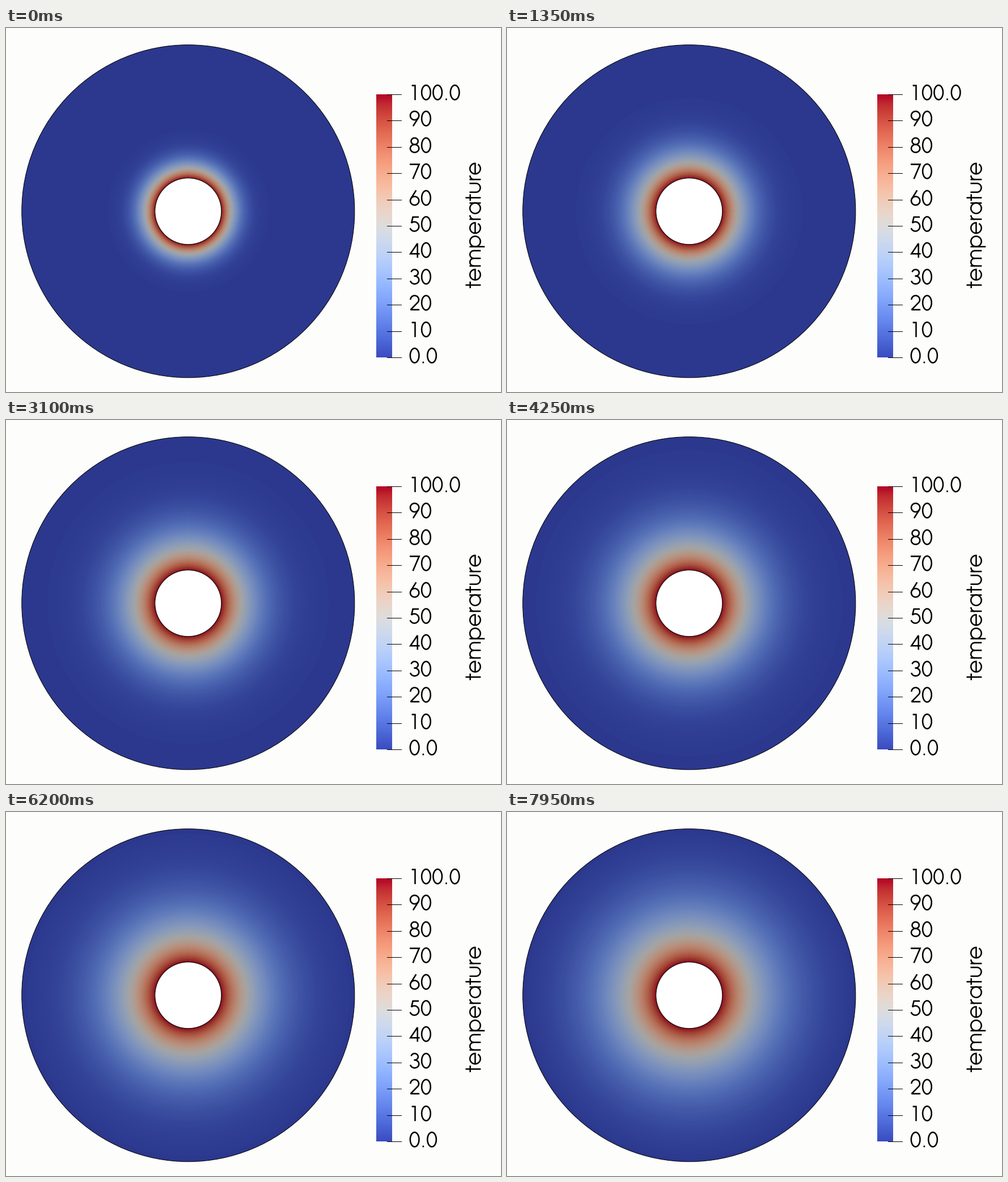
These frames come from a looping animation (873 px wide and 642 px high, 8 s). A matplotlib script:

```python
import numpy as np
import matplotlib
import matplotlib.pyplot as plt
from matplotlib.animation import FuncAnimation
from matplotlib.patches import Circle

W, H, DPI = 873, 642, 100
PT = 72 / DPI                      # points per pixel
FRAMES, INTERVAL = 160, 50
STEP_MS = 60                       # one simulation step

CX, CY = 321.3, 323.2
R_IN, R_OUT = 58.5, 293.5
SHADE = 0.74                       # lighting on the disc surface
START = 11                         # steps already elapsed at time zero
DIFFUSION = 41                     # px^2 per simulation step

CMAP = matplotlib.colormaps["coolwarm"]


# --- heat equation on the annulus, radially symmetric -----------------------
def solve(steps, dr=0.5, substeps=4):
    r = np.arange(R_IN, R_OUT + dr / 2, dr)
    n = len(r)
    k = DIFFUSION / substeps / dr ** 2
    m = np.eye(n)
    for i in range(1, n - 1):
        lo, hi = k * (1 - dr / (2 * r[i])), k * (1 + dr / (2 * r[i]))
        m[i, i - 1:i + 2] = -lo, 1 + lo + hi, -hi
    advance = np.linalg.matrix_power(np.linalg.inv(m), substeps)
    temp = np.zeros(n)
    temp[0] = 1
    out = []
    for _ in range(steps):
        out.append(temp)
        temp = advance @ temp
    return r, np.array(out)


# --- stroke lettering, units of 1/1000 em -----------------------------------
def arc(cx, cy, rx, ry, a0=0, a1=360):
    a = np.radians(np.linspace(a0, a1, 60))
    return np.column_stack([cx + rx * np.cos(a), cy + ry * np.sin(a)])


def line(*pts):
    return np.array(pts, float)


def join(*parts):
    return np.vstack(parts)


def turned(strokes):
    return [np.array([554, 740]) - s for s in strokes]


SIX = [arc(277, 230, 208, 207), line((97, 333), (350, 737))]
ARCH = arc(285, 340, 185, 185, 180, 0)

GLYPHS = {
    "0": (554, [arc(277, 370, 213, 348)]),
    "1": (554, [line((140, 704), (300, 704), (300, 0))]),
    "2": (554, [join(arc(277, 517, 200, 200, 180, -38),
                     line((85, 36), (510, 36)))]),
    "3": (554, [join(arc(277, 560, 168, 157, 168, -90),
                     arc(277, 212, 208, 190, 90, -168))]),
    "4": (554, [line((521, 190), (75, 190), (415, 690), (415, 0))]),
    "5": (554, [join(line((480, 704), (195, 704)),
                     arc(265, 248, 218, 225, 130, -160))]),
    "6": (554, SIX),
    "7": (554, [line((42, 704), (495, 704), (195, 0))]),
    "8": (554, [arc(277, 560, 168, 157), arc(277, 212, 208, 190)]),
    "9": (554, turned(SIX)),
    ".": (277, [line((139, 0), (139, 76))]),
    "t": (339, [line((160, 740), (160, 0)), line((10, 513), (330, 513))]),
    "e": (650, [join(line((71, 272)), arc(325, 272, 254, 254, 0, 328))]),
    "m": (938, [line((100, 0), (100, 547)),
                join(ARCH, line((470, 0))),
                join(ARCH + [370, 0], line((840, 0)))]),
    "p": (682, [line((98, -192), (98, 547)), arc(350, 272, 254, 254)]),
    "r": (301, [line((100, 0), (100, 547)),
                arc(295, 340, 195, 182, 180, 90)]),
    "a": (683, [line((585, 0), (585, 547)), arc(333, 272, 254, 254)]),
    "u": (608, [join(line((90, 547)), arc(304, 235, 214, 212, 180, 360),
                     line((518, 547)))]),
}


def stroke_line(ax, x, y, width):
    ax.plot(x, y, color="black", lw=width * PT, snap=False,
            solid_capstyle="butt", solid_joinstyle="miter")


def letter(ax, text, x, y, size, upright=True):
    s, pen = size / 1000, 0
    for ch in text:
        width, strokes = GLYPHS[ch]
        for stroke in strokes:
            u, v = (pen + stroke[:, 0]) * s, stroke[:, 1] * s
            px, py = (x + u, y - v) if upright else (x - v, y - u)
            stroke_line(ax, px, py, 70 * s)
        pen += width


# --- stage ------------------------------------------------------------------
fig = plt.figure(figsize=(W / DPI, H / DPI), dpi=DPI, facecolor="#fdfdfc")
ax = fig.add_axes([0, 0, 1, 1])
ax.axis("off")

radii, profiles = solve(START + FRAMES * INTERVAL // STEP_MS + 1)
colors = CMAP(profiles)[..., :3] * SHADE
colors = np.round(colors * 255).astype(np.uint8)

x0, x1, y0, y1 = 26, 616, 28, 619
gx, gy = np.meshgrid(np.arange(x0, x1) + 0.5, np.arange(y0, y1) + 0.5)
dist = np.hypot(gx - CX, gy - CY)
index = np.clip(np.rint((dist - R_IN) * 2), 0, len(radii) - 1).astype(int)

disc = ax.imshow(colors[START][index], extent=(x0, x1, y1, y0),
                 interpolation="nearest", aspect="auto")
disc.set_clip_path(Circle((CX, CY), R_OUT, transform=ax.transData))
for radius, fill in ((R_OUT, "none"), (R_IN, "white")):
    ax.add_patch(Circle((CX, CY), radius, fc=fill, ec="black", lw=PT))

# colour bar
TOP, BOTTOM = 117, 581
ax.imshow(np.linspace(1, 0, BOTTOM - TOP)[:, None], cmap=CMAP,
          extent=(653, 681, BOTTOM, TOP), interpolation="nearest",
          aspect="auto")
for i in range(11):
    y = TOP + round((BOTTOM - TOP) * i / 10) + 0.5
    value = 100 - 10 * i
    stroke_line(ax, [672, 698], [y, y], 1)
    label = f"{value:.1f}" if value in (0, 100) else str(value)
    letter(ax, label, 710.5, y + 9.7, 36.6)
letter(ax, "temperature", 837.3, 459.2, 36.3, upright=False)

ax.set_xlim(0, W)
ax.set_ylim(H, 0)


def update(frame):
    step = START + frame * INTERVAL // STEP_MS
    disc.set_data(colors[step][index])
    return [disc]


anim = FuncAnimation(fig, update, frames=FRAMES, interval=INTERVAL,
                     repeat=True, repeat_delay=0, blit=False)
plt.show()
```
